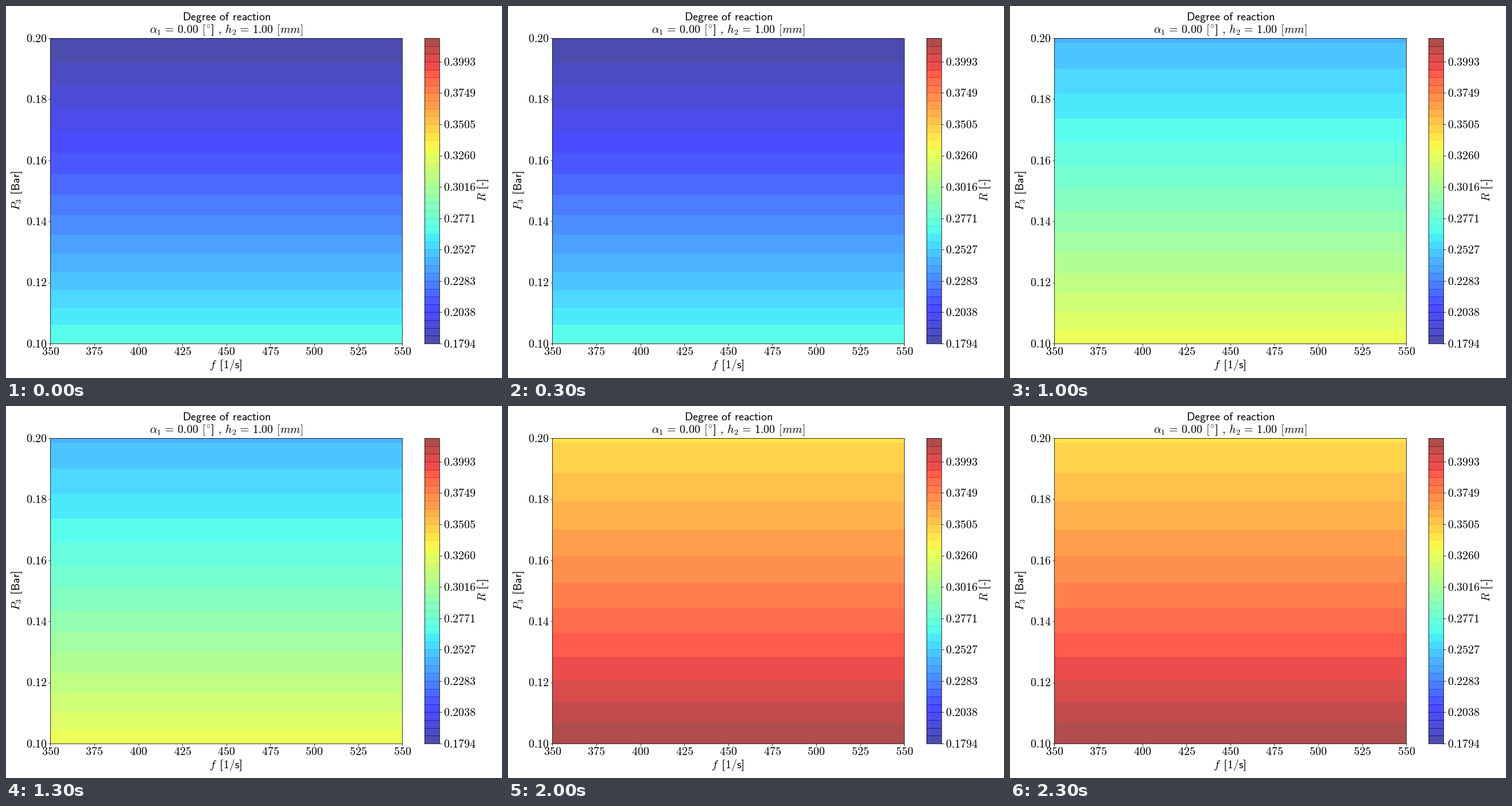
A matplotlib script that plays this animation: 864 px wide and 648 px high, repeating every 2.5 s.

```python
import numpy as np
import matplotlib.pyplot as plt
from matplotlib.animation import FuncAnimation
from matplotlib.colors import Normalize

W, H, DPI = 864, 648, 72
LEFT, RIGHT, TOP, BOTTOM = 77.3, 690.3, 56, 588
BAR_LEFT, BAR_RIGHT = 729, 755
ALPHA = 0.7

plt.rcParams.update({"mathtext.fontset": "cm", "font.size": 20})

levels = np.linspace(0.17939, 0.41766, 40)
norm = Normalize(levels[0], levels[-1])
jet = plt.get_cmap("jet")

# Share of the enthalpy drop left to the stator at 0.1 bar, per step
stator_share = [0.7279, 0.7008, 0.6692, 0.63045, 0.58234]
freq = np.array([350, 550])
pressure = np.linspace(0.1, 0.2, 401)


def reaction(share):
    """Degree of reaction over pressure for an isentropic expansion."""
    a = 0.058
    drop = 1 - 0.1598 * ((pressure / 0.1) ** a - 1) / a
    return np.clip(1 - share / drop, levels[0], levels[-1])


fig = plt.figure(figsize=(W / DPI, H / DPI), dpi=DPI, facecolor="white")


def add_axes(x0, x1):
    return fig.add_axes([x0 / W, 1 - BOTTOM / H, (x1 - x0) / W, (BOTTOM - TOP) / H])


def put(x, y, text, ha="center", rotation=0):
    """Place text by its baseline, in pixels from the top left."""
    fig.text(x / W, 1 - y / H, f"${text}$", ha=ha, va="baseline",
             rotation=rotation, rotation_mode="anchor")


def pixel_y(value, low, high):
    return BOTTOM - (value - low) / (high - low) * (BOTTOM - TOP)


ax = add_axes(LEFT, RIGHT)
bar = add_axes(BAR_LEFT, BAR_RIGHT)

# Axis ticks and their labels
f_ticks = np.arange(350, 551, 25)
p_ticks = np.linspace(0.1, 0.2, 6)
ax.set_xticks(f_ticks, [""] * len(f_ticks))
ax.set_yticks(p_ticks, [""] * len(p_ticks))
for f in f_ticks:
    put(LEFT + (f - 350) / 200 * (RIGHT - LEFT), 608, f"{f}")
for p in p_ticks:
    put(71.7, pixel_y(p, 0.1, 0.2) + 6.8, f"{p:.2f}", ha="right")

# Colour bar with darker seams where neighbouring bands overlap
mids = (levels[:-1] + levels[1:]) / 2
bar.imshow(mids[:, None], origin="lower", aspect="auto", cmap=jet, norm=norm,
           alpha=ALPHA, interpolation="nearest",
           extent=(0, 1, levels[0], levels[-1]))
bar.hlines(levels[1:-1], 0, 1, colors=jet(norm(mids[1:])), alpha=ALPHA, lw=1)
bar.set_xlim(0, 1)
bar.set_ylim(levels[0], levels[-1])
bar.set_xticks([])
bar.yaxis.tick_right()
bar.set_yticks(levels[::4], [""] * 10)
for r in levels[::4]:
    put(762, pixel_y(r, levels[0], levels[-1]) + 6.8, f"{r:.4f}", ha="left")

# Titles and axis names; brackets are struck twice for a heavier stem
SP = r"\hspace{0.38}"
EQ = r"\hspace{0.117}=\hspace{0.179}"
OPEN, CLOSE = (rf"{b}\hspace{{-0.27}}{b}" for b in "[]")
center = (LEFT + RIGHT) / 2
put(center, 25, SP.join(rf"\mathsf{{{w}}}" for w in "Degree of reaction".split()))
put(center, 47,
    rf"\alpha_1{EQ}\mathsf{{0.00}}{SP}{OPEN}^{{\circ}}{CLOSE}{SP}"
    rf"\mathsf{{,}}{SP}h_2{EQ}\mathsf{{1.00}}{SP}[mm]")
put(center - 0.6, 631.5, rf"f\hspace{{0.45}}{OPEN}\mathsf{{1/s}}{CLOSE}")
put(24.5, 321, rf"P_3{SP}{OPEN}\mathsf{{Bar}}{CLOSE}", rotation=90)
put(836, 320.5, rf"R{SP}{OPEN}\mathsf{{‐}}{CLOSE}", rotation=90)


def update(step):
    for old in list(ax.collections):
        old.remove()
    field = np.repeat(reaction(stator_share[step])[:, None], 2, axis=1)
    ax.contourf(freq, pressure, field, levels=levels, cmap=jet, norm=norm,
                alpha=ALPHA)
    ax.set_xlim(350, 550)
    ax.set_ylim(0.1, 0.2)
    return ax.collections


anim = FuncAnimation(fig, update, frames=len(stator_share), interval=500,
                     repeat=True, repeat_delay=0, blit=False)
plt.show()
```
